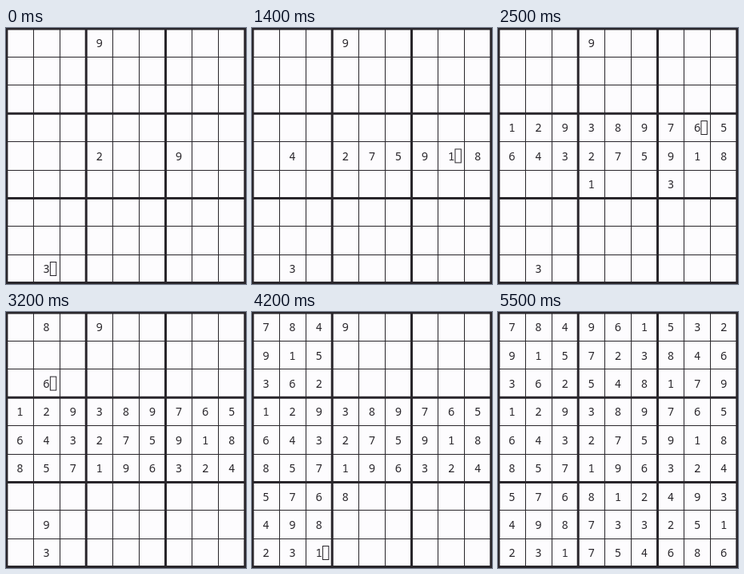
Recreate the animation shown at these times as an HTML page. Size 300 px wide and 321 px high, loop 6.3 s.

```html
<!DOCTYPE html>
<html lang="en">
<head>
<meta charset="utf-8">
<title>Number grid</title>
<style>
  html, body { margin: 0; width: 100%; height: 100%; overflow: hidden; background: #fdfcfe; }
  svg { display: block; width: 100%; height: 100%; }
  text { font: 14px "Noto Sans Mono", "DejaVu Sans Mono", monospace; text-anchor: middle; fill: #29262b; }
</style>
</head>
<body>
<svg id="stage" viewBox="0 0 300 321"></svg>
<script>
const LOOP = 6300, START = 1000, STEP = 100;
const INK = '#29262b';
const W = 33.1, H = 35.4, LEFT = 0.9, TOP = 1;

const digits = [
  '784961532', '915723846', '362548179',
  '129389765', '643275918', '857196324',
  '576812493', '498733251', '231754686'
];

// Cells (row, column) typed in each step; the cursor follows the last one, "-" waits.
const given = '03 43 46 81';
const script = `41|44|45|48|47|33|-|40 53|-|42 56|30|31 32|34|35 36|38|37|
  50 51|52|54 55|58 57|71|01|21|22|20 00|02|11 10|12 60|80 61 70|63|
  62|72|82|85|05|07|-|08|24|65|84 83 04 06 64|66 86 67 68|
  87 88 73 74 75|76 77 23 25 26|27 28 13 14 15 16 17 18 78`;
const steps = [given, ...script.split('|')].map(s => s.trim().replace('-', ''))
  .map(s => s ? s.split(' ') : []);

const stage = document.getElementById('stage');

function add(tag, attrs) {
  const el = document.createElementNS('http://www.w3.org/2000/svg', tag);
  for (const key in attrs) el.setAttribute(key, attrs[key]);
  return stage.appendChild(el);
}

const midX = col => LEFT + W * (col + 0.5);
const midY = row => TOP + H * (row + 0.5);

function drawGrid() {
  for (const thick of [false, true]) {
    for (let i = 0; i < 10; i++) {
      if ((i % 3 === 0) !== thick) continue;
      const snap = v => thick ? v : Math.floor(v + 0.01) + 0.5;
      const x = snap(LEFT + W * i), y = snap(TOP + H * i);
      add('path', {
        d: `M${x} 0V321M0 ${y}H300`,
        stroke: INK, 'stroke-width': thick ? 3 : 1, fill: 'none'
      });
    }
  }
}

drawGrid();

const cells = [];
steps.forEach((group, step) => {
  for (const id of group) {
    const [row, col] = [...id].map(Number);
    const el = add('text', { x: midX(col), y: midY(row) + 5.4 });
    el.textContent = digits[row][col];
    cells.push({ el, step, row, col });
  }
});

const cursor = add('rect', { width: 7.4, height: 17, fill: 'none', stroke: INK });

function render(t) {
  const step = t < START ? 0 : Math.floor((t - START) / STEP) + 1;
  let last;
  for (const cell of cells) {
    const shown = cell.step <= step;
    cell.el.style.display = shown ? '' : 'none';
    if (shown) last = cell;
  }
  cursor.setAttribute('x', midX(last.col) + 4.8);
  cursor.setAttribute('y', midY(last.row) - 8.4);
  cursor.style.display = step < steps.length ? '' : 'none';
}

const begin = performance.now();
function tick() {
  render((performance.now() - begin) % LOOP);
  requestAnimationFrame(tick);
}
tick();
</script>
</body>
</html>
```
